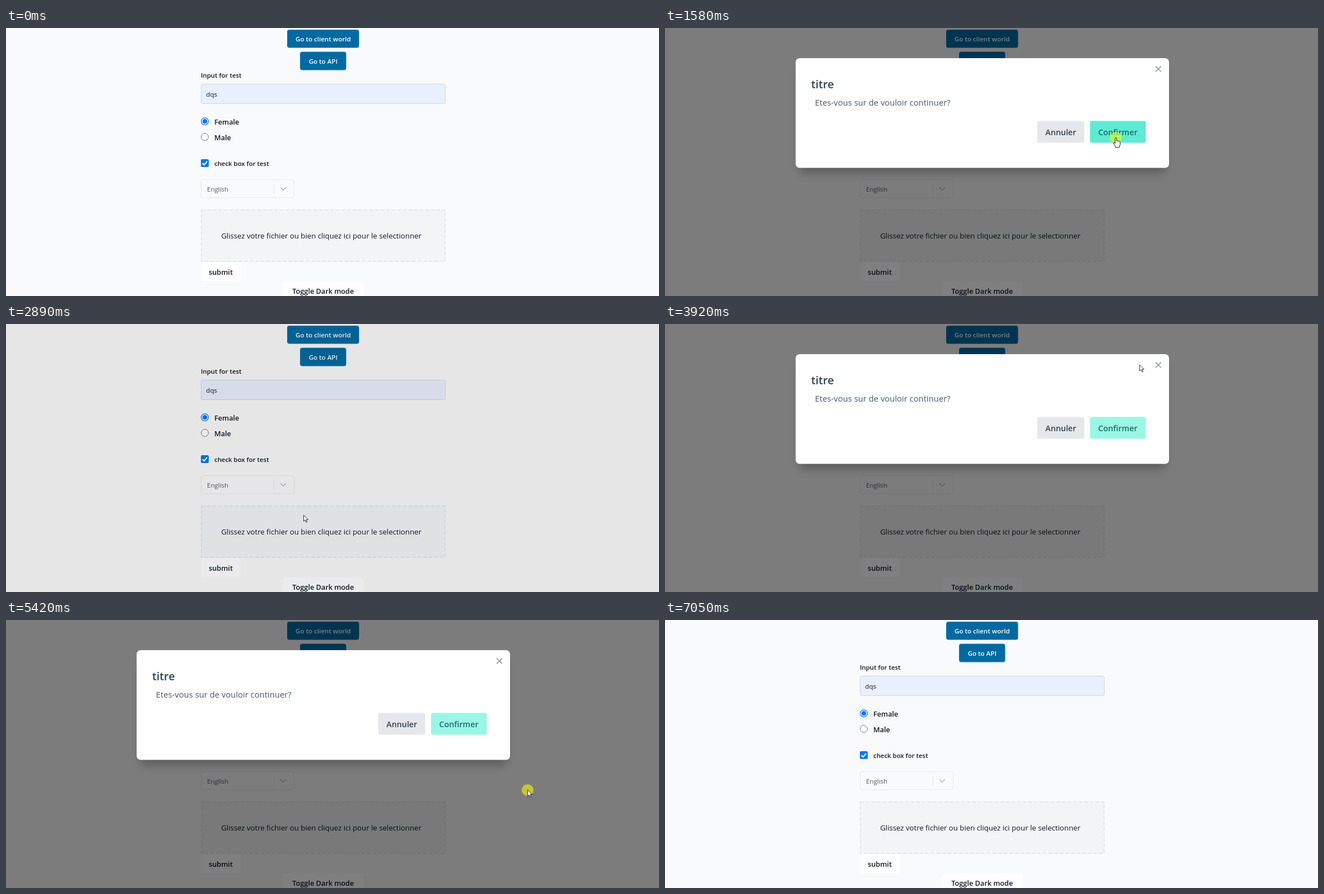
An HTML page for the animation above (7110 ms loop, 1166 by 480 pixels).

```html
<!DOCTYPE html>
<html lang="fr">
<head>
<meta charset="utf-8">
<title>Dialog demo</title>
<style>
  html, body { margin: 0; width: 100%; height: 100%; overflow: hidden; background: #f9fafb; }
  svg { display: block; width: 100vw; height: 100vh; font-family: "Open Sans", "Noto Sans", sans-serif; fill: #111827; }
  .b { font-weight: 600; }
  .mid { text-anchor: middle; }
  .s { font-size: 11.4px; }
  .m { font-size: 12.7px; }
  .dlg { font-size: 14.25px; }
</style>
</head>
<body>
<svg viewBox="0 0 1166 480">
  <defs>
    <filter id="soft" x="-10%" y="-30%" width="120%" height="160%"><feGaussianBlur stdDeviation="8"/></filter>
  </defs>

  <rect width="1166" height="480" fill="#f9fafb"/>

  <g class="b mid" fill="#fff" font-size="11.55">
    <g fill="#0369a1" stroke="#0b78b4">
      <rect x="502.5" y="3.5" width="127.5" height="31.5" rx="3"/>
      <rect x="525.5" y="43" width="81.5" height="32" rx="3"/>
    </g>
    <text x="566.3" y="24">Go to client world</text>
    <text x="566.3" y="63.5">Go to API</text>
  </g>

  <text class="b s" x="348" y="89">Input for test</text>
  <rect x="348.5" y="100.5" width="436" height="35" rx="3" fill="#e8f0fe" stroke="#d1d5db"/>
  <text x="357.3" y="122.5" font-size="11.6">dqs</text>

  <circle cx="355" cy="167.2" r="6.4" fill="#fff" stroke="#0075ff" stroke-width="1.2"/>
  <circle cx="355" cy="167.2" r="4.1" fill="#0075ff"/>
  <circle cx="355" cy="195" r="6.4" fill="#fff" stroke="#767676"/>
  <text class="b m" x="372" y="172.5">Female</text>
  <text class="b m" x="372" y="200.5">Male</text>

  <rect x="348" y="235" width="14" height="14" rx="2" fill="#0075ff"/>
  <path d="M350.8 242.2l3 3 5.4-6.2" fill="none" stroke="#fff" stroke-width="2"/>
  <text class="b s" x="372" y="247">check box for test</text>

  <rect x="348.5" y="271.5" width="166" height="32.5" rx="3" fill="none" stroke="#e5e7eb"/>
  <path d="M478.5 279v18" stroke="#dfe1e4"/>
  <path d="M490 285.3l5 5 5-5" fill="none" stroke="#a3a6aa" stroke-width="1.2"/>
  <text x="359" y="292.5" font-size="11.5" fill="#55585e">English</text>

  <rect x="348" y="325" width="437" height="94" fill="#f3f4f6"/>
  <rect x="349" y="326" width="435" height="92" fill="none" stroke="#e5e7eb" stroke-width="2" stroke-dasharray="6 4"/>
  <text class="mid" x="563" y="377" font-size="13.2">Glissez votre fichier ou bien cliquez ici pour le selectionner</text>

  <rect x="348" y="419" width="71" height="34.5" rx="3.5" fill="#fff"/>
  <rect x="494.5" y="453.5" width="144" height="35" rx="3.5" fill="#fff"/>
  <text class="b m mid" x="383.5" y="441.5">submit</text>
  <text class="b m mid" x="566.3" y="476">Toggle Dark mode</text>
  <g id="ring" fill="none">
    <rect x="345.5" y="416.5" width="76" height="39.5" rx="5" stroke="#fff"/>
    <rect x="347" y="418" width="73" height="36.5" rx="4" stroke="#101010" stroke-width="2"/>
  </g>

  <rect id="shade" width="1166" height="480" fill="#000"/>

  <g id="panel">
    <rect x="240" y="70" width="654" height="190" rx="7" opacity=".24" fill="#000" filter="url(#soft)"/>
    <rect x="233.3" y="54" width="666.7" height="196.5" rx="7" fill="#fff"/>
    <path d="M876 68.4l9.8 9.8m0-9.8l-9.8 9.8" stroke="#9096a3" stroke-width="1.6"/>
    <text class="b" x="261" y="107.5" font-size="19.8" fill="#334155">titre</text>
    <text x="267.8" y="138.7" font-size="14.8" fill="#475569">Etes-vous sur de vouloir continuer?</text>
    <rect id="cancel" x="664.5" y="166.5" width="84" height="39" rx="3.5"/>
    <rect id="confirm" x="759" y="166.5" width="99.5" height="39" rx="3.5"/>
    <text class="b dlg mid" x="706.8" y="192" fill="#374151">Annuler</text>
    <text class="b dlg mid" x="808.5" y="192" fill="#1b6b66">Confirmer</text>
  </g>

  <g id="cursor" stroke-linejoin="round">
    <circle id="press" cx=".3" cy=".7" r="10.5" fill="#ff0" fill-opacity=".56"/>
    <path id="arrow" d="M.5.6V11.6L3.1 9.2 5 13.4 6.8 12.6 5 8.6H8.5Z" fill="#fff" stroke="#000" stroke-width=".8"/>
    <path id="hand" d="M-1.2 1.2Q0-.6 1.3 1.2V6Q2.6 5 3.6 6.5 4.7 5.6 5.7 7.1 7.6 6.6 7.8 8.6V12Q7.6 14.5 6.3 16V18H-.4V16.4L-4.3 11Q-4.6 9-2.8 9.4L-1.2 10.8Z" fill="#fff" stroke="#000" stroke-width=".9"/>
  </g>
</svg>

<script>
const LOOP = 7110, OPEN = 240, CLOSE = 170, PANEL_CLOSE = 130;
const el = id => document.getElementById(id);
const show = (id, on) => el(id).setAttribute("display", on ? "inline" : "none");
const clamp = v => Math.max(0, Math.min(1, v));

// Pointer stops: time, x, y
const submit = [373, 430];
const path = [
  [110, 1018, 484], [690, ...submit], [1040, ...submit],
  [1500, 805, 196], [1690, 805, 196],
  [2010, ...submit], [2480, ...submit],
  [2630, 706, 190], [2750, 706, 190],
  [2890, 532, 341], [3085, ...submit], [3440, ...submit],
  [3920, 846, 73], [4045, 886, 76], [4260, 886, 76],
  [4580, ...submit], [5010, ...submit],
  [5340, 931, 304], [5490, 931, 304],
  [5820, ...submit], [6180, ...submit],
  [6375, 392, 484], [LOOP, 392, 484]
];
const clicks = [[760, 890], [1520, 1650], [2030, 2120], [2650, 2750], [3220, 3300],
  [4190, 4260], [4590, 4650], [5350, 5480], [5840, 5920]];
const dialogs = [[890, 1650], [2110, 2747], [3300, 4260], [4640, 5480], [5920, 6545]];

// Velocity at a stop: zero beside a rest, otherwise the mean slope
function slope(i, k) {
  const a = path[i - 1], b = path[i], c = path[i + 1];
  const rest = (p, q) => !p || !q || (p[1] === q[1] && p[2] === q[2]);
  return rest(a, b) || rest(b, c) || b[1] === submit[0] ? 0 : (c[k] - a[k]) / (c[0] - a[0]);
}

function pointer(t) {
  let i = 0;
  if (t <= path[0][0]) return path[0].slice(1);
  while (i < path.length - 2 && t >= path[i + 1][0]) i++;
  const p = path[i], q = path[i + 1], d = q[0] - p[0], u = (t - p[0]) / d;
  const s = u * u * (3 - 2 * u);
  return [1, 2].map(k => p[k] + (q[k] - p[k]) * s
    + d * u * (1 - u) * ((1 - u) * slope(i, k) - u * slope(i + 1, k)));
}

function dialogAt(t) {
  const span = dialogs.find(([a, b]) => t >= a && t < b + CLOSE);
  if (!span) return { shade: 0, panel: 0 };
  const [a, b] = span;
  if (t < b) {
    const v = 1 - (1 - clamp((t - a) / OPEN)) ** 2;
    return { shade: v, panel: v };
  }
  return { shade: 1 - (t - b) / CLOSE, panel: 1 - clamp((t - b) / PANEL_CLOSE) };
}

const inside = ([x, y], l, t, r, b) => x >= l && x <= r && y >= t && y <= b;

function draw(t) {
  const pos = pointer(t), { shade, panel } = dialogAt(t);
  const open = panel > 0;
  const onCancel = open && inside(pos, 664, 166, 749, 206);
  const onConfirm = open && inside(pos, 759, 166, 859, 206);
  const onClose = open && inside(pos, 870, 62, 892, 84);
  const onSubmit = !shade && inside(pos, 348, 419, 419, 453);
  const hand = onCancel || onConfirm || onClose || onSubmit;

  el("shade").setAttribute("opacity", shade * 0.5);
  el("panel").setAttribute("opacity", panel);
  const k = 0.95 + 0.05 * panel;
  el("panel").setAttribute("transform", `translate(566.7 152) scale(${k}) translate(-566.7 -152)`);
  el("cancel").setAttribute("fill", onCancel ? "#d1d5db" : "#e5e7eb");
  el("confirm").setAttribute("fill", onConfirm ? "#5eead4" : "#99f6e4");

  el("cursor").setAttribute("transform", `translate(${pos[0]} ${pos[1]})`);
  show("cursor", pos[1] < 482);
  show("press", clicks.some(([a, b]) => t >= a && t < b));
  show("hand", hand);
  show("arrow", !hand);
  show("ring", t >= 6590 && t < 7050);
}

const start = performance.now();
function frame() {
  draw((performance.now() - start) % LOOP);
  requestAnimationFrame(frame);
}
draw(0);
requestAnimationFrame(frame);
</script>
</body>
</html>
```
